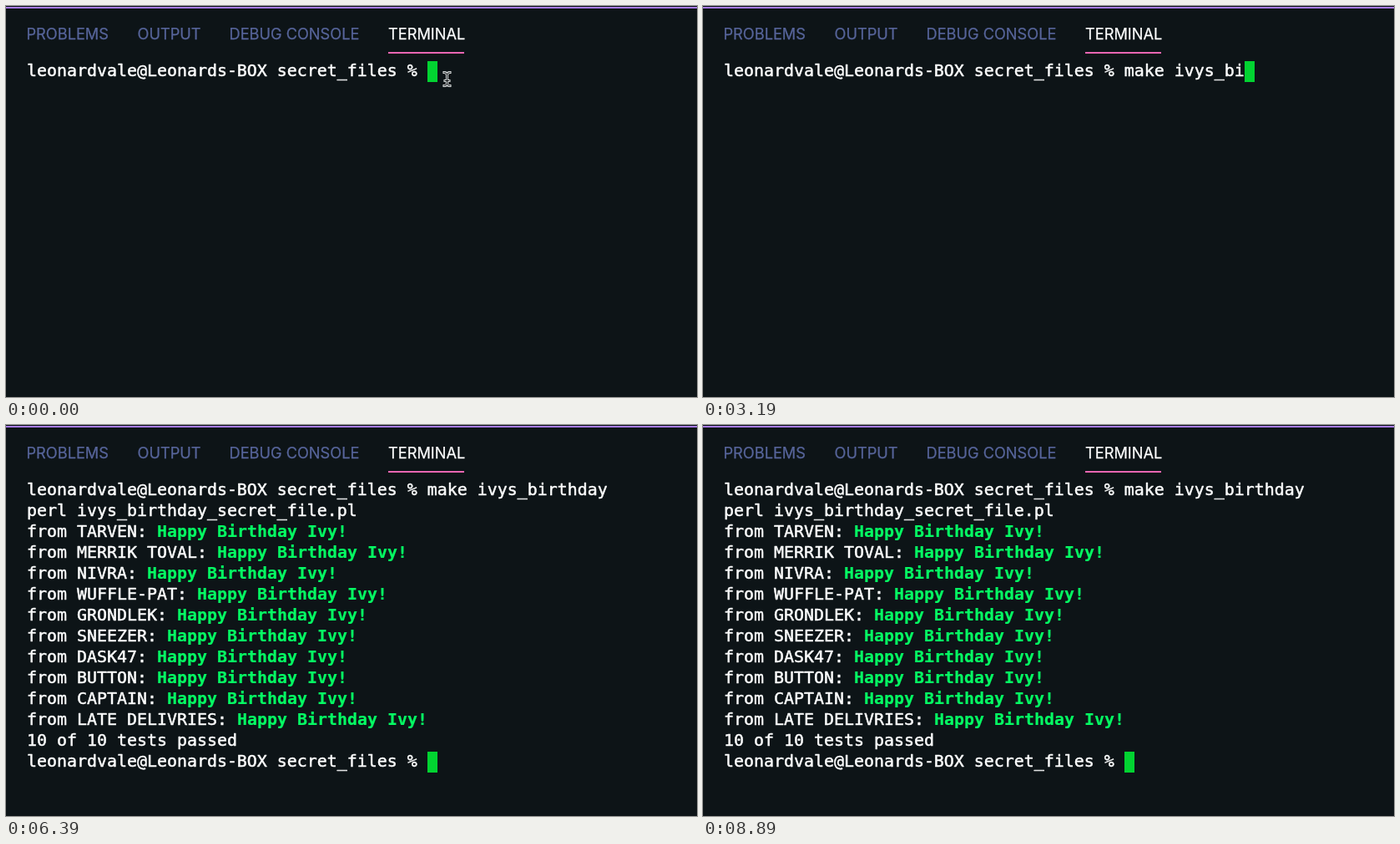
Write an HTML page with a canvas that moves like this. It is 828 px wide and 468 px high and loops after 8.99 s.

```html
<!DOCTYPE html>
<html lang="en">
<head>
<meta charset="utf-8">
<title>Birthday terminal</title>
<style>
  html, body { margin: 0; width: 100%; height: 100%; overflow: hidden; background: #0d1417; }
  canvas { display: block; }
</style>
</head>
<body>
<canvas id="stage" width="828" height="468"></canvas>
<script>
const ctx = document.getElementById("stage").getContext("2d");
const LOOP = 8990;
const CELL = 12, ROW = 25, LEFT = 25, TOP = 66;
const MONO = '19.93px "DejaVu Sans Mono", monospace';
const WHITE = "#fdfefe", GREEN = "#05fb63";

const PROMPT = "leonardvale@Leonards-BOX secret_files % ";
const COMMAND = "make ivys_birthday";
const GREETING = "Happy Birthday Ivy!";
const SENDERS = ["TARVEN", "MERRIK TOVAL", "NIVRA", "WUFFLE-PAT", "GRONDLEK",
  "SNEEZER", "DASK47", "BUTTON", "CAPTAIN", "LATE DELIVRIES"];

// One time per typed character, then the start and pace of the output.
const KEYS = [490, 590, 690, 790, 990, 1190, 1390, 1590, 2390, 2590,
  2890, 3090, 3390, 3790, 3990, 4090, 4290, 4490];
const RUN = 4590, FIRST = 4790, STEP = 150, DONE = 6290;

function rect(color, x, y, w, h) {
  ctx.fillStyle = color;
  ctx.fillRect(x, y, w, h);
}

// A hairline outline gives the glyphs their slightly heavy smoothing.
function text(str, x, y, color, font, outline) {
  ctx.font = font;
  ctx.fillStyle = ctx.strokeStyle = color;
  ctx.lineWidth = outline;
  ctx.lineJoin = "round";
  ctx.fillText(str, x, y);
  ctx.strokeText(str, x, y);
}

function print(str, col, row, color = WHITE, weight = "") {
  text(str, LEFT + col * CELL, TOP + 18 + row * ROW, color, weight + MONO, weight ? 0.2 : 0.5);
}

function tab(label, x, color = "#57659b") {
  text(label, x, 40, color, "18.2px Inter, sans-serif", 0.25);
}

function drawPanel() {
  rect("#0d1417", 0, 0, 828, 468);
  rect("#a97df2", 0, 1, 828, 2);
  tab("PROBLEMS", 24.5);
  tab("OUTPUT", 157.5);
  tab("DEBUG CONSOLE", 267.5);
  tab("TERMINAL", 458, WHITE);
  rect("#e966b2", 458, 55, 91, 2);
}

function drawPointer() {
  const beam = new Path2D("M525 79.5Q528.5 79.5 528.5 82.5Q528.5 79.5 532 79.5" +
    "M528.5 82V93M526 89.5H531M525 95.5Q528.5 95.5 528.5 92.5Q528.5 95.5 532 95.5");
  ctx.lineCap = "square";
  for (const [color, width] of [["#dfe3e4", 3], ["#080b0d", 1]]) {
    ctx.strokeStyle = color;
    ctx.lineWidth = width;
    ctx.stroke(beam);
  }
}

function drawTerminal(t) {
  const typed = COMMAND.slice(0, KEYS.filter(k => k <= t).length);
  let col = PROMPT.length + typed.length, row = 0;
  print(PROMPT + typed, 0, 0);

  if (t >= RUN) {
    print("perl ivys_birthday_secret_file.pl", 0, 1);
    col = 0;
    row = 2;
  }
  SENDERS.forEach((name, i) => {
    if (t < FIRST + i * STEP) return;
    const head = `from ${name}: `;
    row = i + 2;
    col = head.length;
    print(head, 0, row);
    const greetAt = i < SENDERS.length - 1 ? FIRST + (i + 1) * STEP : DONE;
    if (t >= greetAt) print(GREETING, col, row, GREEN, "bold ");
  });
  if (t >= DONE) {
    print("10 of 10 tests passed", 0, 12);
    print(PROMPT, 0, 13);
    row = 13;
    col = PROMPT.length;
  }
  rect("#02d331", LEFT + col * CELL, TOP + row * ROW, CELL, ROW);
}

function frame() {
  const t = performance.now() % LOOP;
  drawPanel();
  drawTerminal(t);
  if (t < KEYS[0]) drawPointer();
  requestAnimationFrame(frame);
}
frame();
</script>
</body>
</html>
```
